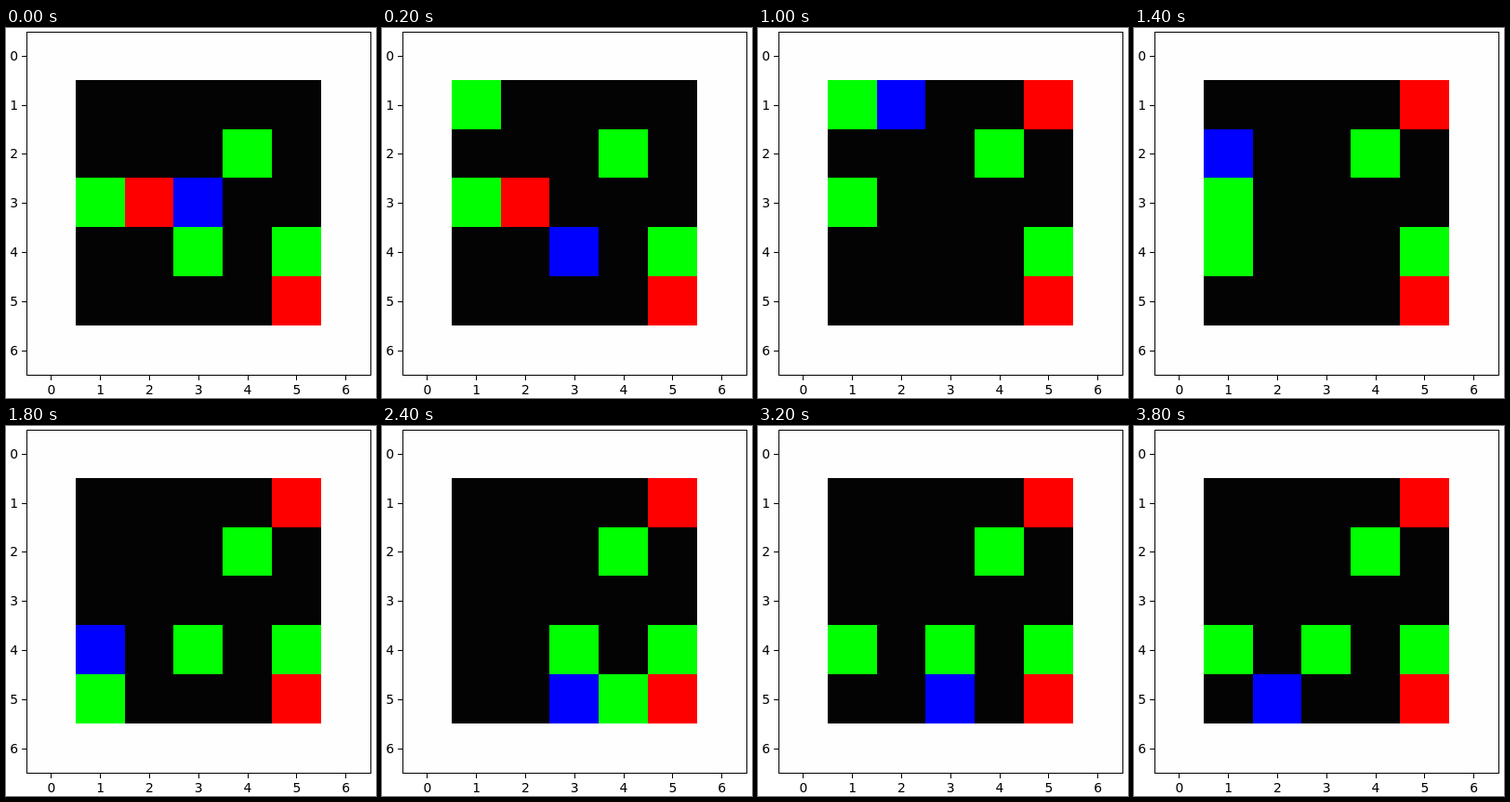
These frames come from a looping animation (398 by 398 pixels, 4 s). An HTML page with a canvas:

```html
<!DOCTYPE html>
<html>
<head>
<meta charset="utf-8">
<style>
  html, body { margin: 0; width: 100%; height: 100%; overflow: hidden; background: #fff; }
  canvas { display: block; }
</style>
</head>
<body>
<canvas id="stage" width="398" height="398"></canvas>
<script>
const ctx = document.getElementById('stage').getContext('2d');
const CELL = 52.8, LEFT = 22.4, TOP = 3.4, STEP_MS = 200;
const GREEN = '#00ff00', RED = '#ff0000', BLUE = '#0000ff';

const MOVES = 'DULUULDDDDRRRLLRLRL';
const DIRS = { U: [0, -1], D: [0, 1], L: [-1, 0], R: [1, 0] };
// An eaten tile reappears at the next of these places.
const SPAWNS = [[1, 1], [5, 1], [1, 4], [3, 4], [1, 5], [4, 5], [1, 4]];
const STEPS = MOVES.length + 1;

const edgeX = i => Math.floor(LEFT + CELL * i + 0.01);
const edgeY = i => Math.floor(TOP + CELL * i + 0.01);

function rect(color, x, y, w, h) {
  ctx.fillStyle = color;
  ctx.fillRect(x, y, w, h);
}

function cells(color, col, row, n = 1) {
  const x = edgeX(col), y = edgeY(row);
  rect(color, x, y, edgeX(col + n) - x, edgeY(row + n) - y);
}

function stateAt(step) {
  const tiles = [
    [4, 2, GREEN], [1, 3, GREEN], [3, 4, GREEN], [5, 4, GREEN],
    [2, 3, RED], [5, 5, RED]
  ];
  let x = 3, y = 3, spawned = 0;
  for (const move of MOVES.slice(0, step)) {
    x += DIRS[move][0];
    y += DIRS[move][1];
    const eaten = tiles.find(t => t[0] === x && t[1] === y);
    if (eaten) [eaten[0], eaten[1]] = SPAWNS[spawned++];
  }
  return [...tiles, [x, y, BLUE]];
}

function drawAxes() {
  rect('#000', 22, 4, 371, 1);
  rect('#000', 22, 373, 371, 1);
  rect('#000', 22, 4, 1, 370);
  rect('#000', 392, 4, 1, 370);
  ctx.font = '13.89px "DejaVu Sans", sans-serif';
  for (let i = 0; i < 7; i++) {
    const x = LEFT + CELL * (i + 0.5), y = TOP + CELL * (i + 0.5);
    rect('#000', Math.floor(x), 374, 1, 5);
    rect('#000', 17, Math.round(y), 5, 1);
    ctx.textAlign = 'center';
    ctx.fillText(i, x, 394);
    ctx.textAlign = 'right';
    ctx.fillText(i, 13, Math.round(y) + 5);
  }
}

function draw(step) {
  rect('#fff', 0, 0, 398, 398);
  rect('#fefefe', 23, 5, 369, 368);
  cells('#030303', 1, 1, 5);
  for (const [col, row, color] of stateAt(step)) cells(color, col, row);
  drawAxes();
}

function tick() {
  draw(Math.floor(performance.now() / STEP_MS) % STEPS);
  requestAnimationFrame(tick);
}
tick();
</script>
</body>
</html>
```
